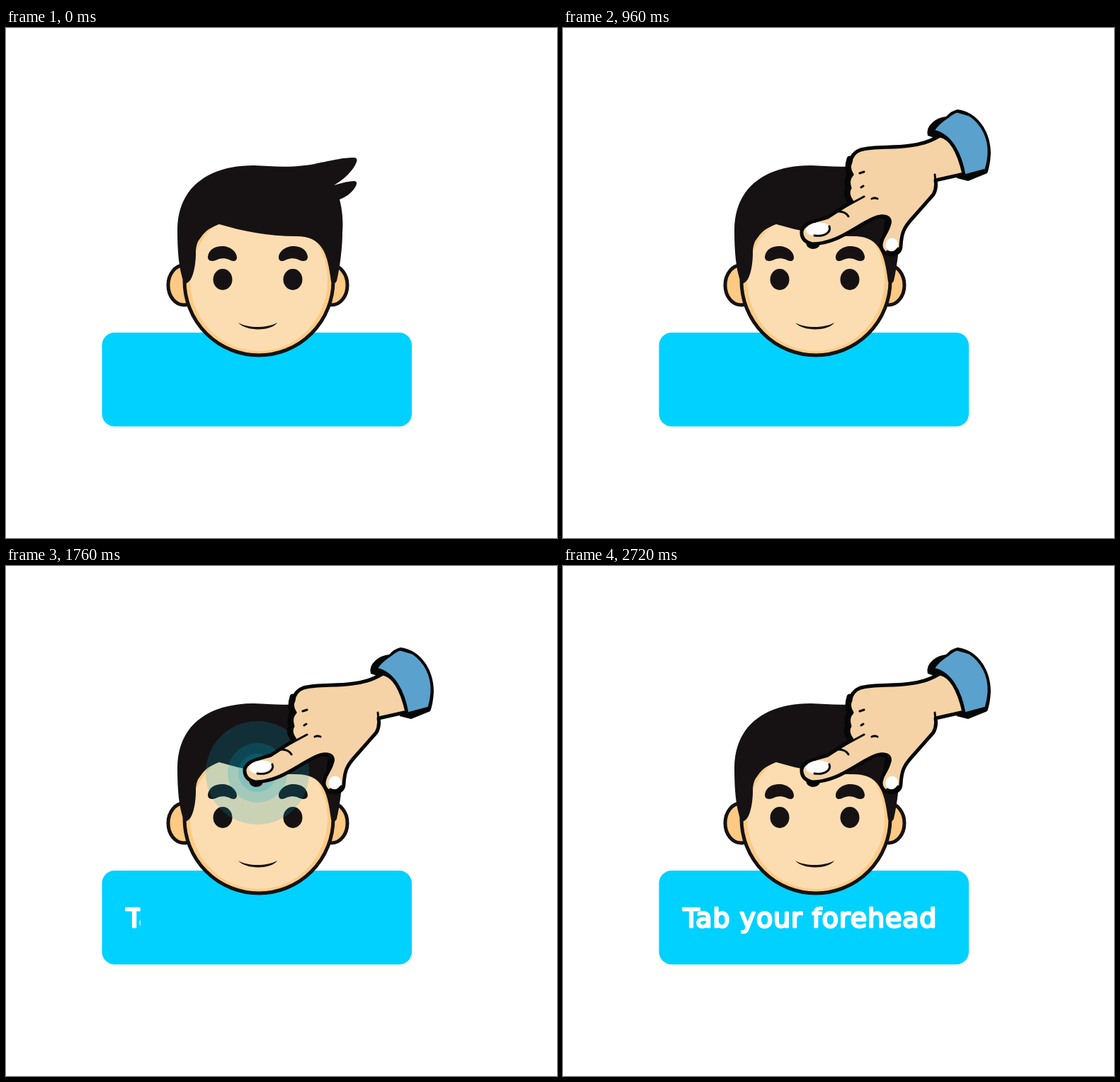
These frames come from a looping animation (778x720 px, 4800 ms). An HTML page:

```html
<!DOCTYPE html>
<html lang="en">
<head>
<meta charset="utf-8">
<title>Tab your forehead</title>
<style>
  html, body { margin: 0; width: 100%; height: 100%; overflow: hidden; background: #fff; }
  svg { display: block; width: 100%; height: 100%; }
  #head { fill: #161213; }
  .ear { fill: #fdc983; stroke: #161213; stroke-width: 5; }
  #hand { fill: #060707; stroke-linecap: round; stroke-linejoin: round; }
  .line { fill: none; stroke: #060707; stroke-width: 3; }
  text {
    font: 38px "DejaVu Sans", Verdana, sans-serif; letter-spacing: .9px;
    fill: #fff; stroke: #fff; stroke-width: 2.6; stroke-linejoin: round;
  }
</style>
</head>
<body>
<svg viewBox="0 0 778 720">
  <clipPath id="wipe"><rect id="reveal" x="163" y="470" height="60"/></clipPath>

  <rect x="135.5" y="430" width="437.5" height="132.5" rx="18" fill="#00d1ff"/>
  <g clip-path="url(#wipe)"><text x="169.500" y="509.500">Tab your forehead</text></g>

  <g id="head">
    <ellipse id="ear" class="ear" cx="251" cy="363" rx="22" ry="28"/>
    <use href="#ear" transform="translate(711) scale(-1 1)"/>
    <circle cx="357" cy="357" r="105" fill="#fdcb85" stroke="#161213" stroke-width="5"/>
    <ellipse cx="357" cy="356" rx="97" ry="100" fill="#fcddb1"/>
    <!-- hair -->
    <path d="M251 359C244 340 242 315 242 285C242 226 285 194 350 194C375 195 395 198 430 193C460 187 475 183 491 183Q497 183 495 189C491 201 477 214 463 222Q482 216 492 216Q497 217 494 223C489 233 479 239 471 242Q477 265 475 288C475 315 470 345 467 357Q463 364 459 358C454 315 445 294 410 294C370 294 335 287 301 277C280 285 268 297 268 318C268 335 264 355 257 359Q253 362 251 359Z"/>
    <g id="eye">
      <path d="M285 323C286 313 295 308 305 308C317 308 326 316 326 324C326 330 320 330 315 327C308 324 301 325 296 328C290 330 285 329 285 323Z"/>
      <ellipse cx="306" cy="355" rx="13.5" ry="15"/>
    </g>
    <use href="#eye" transform="translate(711) scale(-1 1)"/>
    <path d="M328 416C342 424 368 424 383 416Q382 418 380 419C370 428 338 428 328 416Z"/>
  </g>

  <g id="ripple"></g>

  <g id="hand">
    <!-- cuff lining, knuckle shade, hand -->
    <path d="M557 115Q566 116 575 121C592 131 604 152 604 177Q603 195 599 205L572 216L556 212L540 160L515 152Q512 142 522 133Q530 126 541 125Q548 117 557 115Z"/>
    <path class="line" style="stroke-width:9" d="M405 185Q401 198 405 208Q400 214 403 226Q399 234 405 243"/>
    <path fill="#f5d3a6" stroke="#060707" stroke-width="5" d="M532 152Q512 164 490 166C465 170 440 166 420 172Q407 177 406 190Q402 198 408 207Q401 214 405 226Q400 234 408 245L374 267C355 273 340 275 337 287Q336 301 352 305C385 304 405 286 432 272C450 262 464 265 461 276C458 290 449 295 449 307C450 324 477 324 477 308C478 290 481 282 493 269L523 235Q528 226 526 215L566 206C560 180 550 155 532 152Z"/>
    <path fill="#5ba1cd" stroke="#060707" stroke-width="3" d="M557 118L574 123C592 135 602 155 601 178Q600 190 597 200L567 208C562 178 548 150 523 145Q530 134 543 126Q551 119 557 118Z"/>
    <!-- shade between the fingers and below the tip -->
    <path d="M432 270C452 257 467 266 463 277L453 295Q452 281 455 271Q446 266 432 270ZM343 303Q352 307 363 304Q362 312 352 312Q344 311 343 303Z"/>
    <path class="line" d="M425 238L388 258M389 259Q399 259 403 266M419 205L425 203M421 225L424 223M436 241Q440 239 444 241M525 207L526 217"/>
    <g fill="#fff">
      <ellipse cx="360" cy="284" rx="17" ry="9.5" transform="rotate(-5 360 284)"/>
      <ellipse cx="464.5" cy="306.5" rx="9" ry="10"/>
    </g>
    <path class="line" d="M355 293C370 295 379 288 376 280M458 315Q467 320 473 311"/>
  </g>
</svg>
<script>
const LOOP = 4800, STEP = 40;
const $ = id => document.getElementById(id);
const part = (t, from, span) => Math.min(1, Math.max(0, (t - from) / span));

function addDisc(fill) {
  const c = document.createElementNS("http://www.w3.org/2000/svg", "circle");
  c.setAttribute("cx", 355);
  c.setAttribute("cy", 292);
  c.setAttribute("fill", fill);
  return $("ripple").appendChild(c);
}
// Three stacked discs that spread to their own radius, and a warm core.
const rings = [73, 42, 27].map(r => ({ r, disc: addDisc("#00a5c8") }));
const core = addDisc("#f08070");
core.setAttribute("r", 20);

function draw(now) {
  const t = Math.floor(now % LOOP / STEP) * STEP;

  const away = (1 + Math.cos(Math.PI * part(t, 60, 880))) / 2;
  $("hand").setAttribute("transform", `translate(${19 * away} ${-31 * away})`);
  $("hand").setAttribute("visibility", t < STEP ? "hidden" : "visible");

  const grow = part(t, 960, 400), spread = part(t, 1360, 400), fade = part(t, 1360, 760);
  for (const { r, disc } of rings) {
    disc.setAttribute("r", 48 * grow + (r - 48) * spread);
    disc.setAttribute("opacity", .42 * (1 - fade));
  }
  core.setAttribute("opacity", 1.2 * fade * (1 - fade));

  $("reveal").setAttribute("width", 371 * part(t, 1640, 1080) ** 1.2);
}

let start;
function tick(now) {
  start ??= now;
  draw(now - start);
  requestAnimationFrame(tick);
}
draw(0);
requestAnimationFrame(tick);
</script>
</body>
</html>
```
